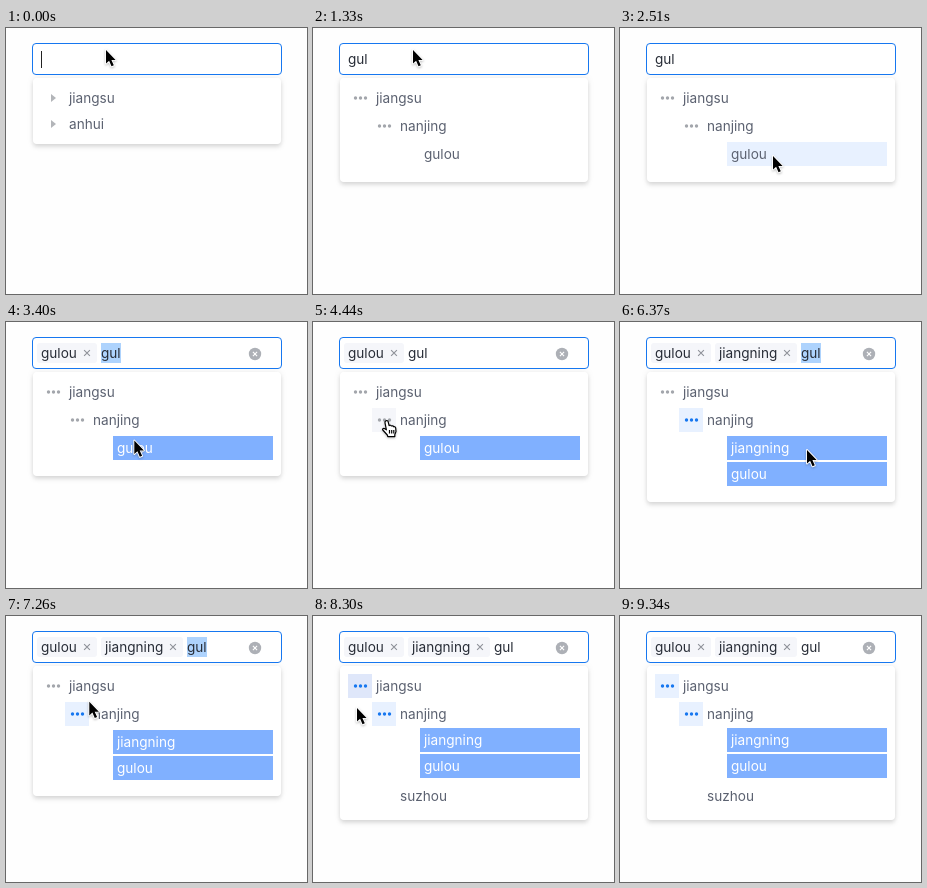
These frames come from a looping animation (301x266 px, 9940 ms). An HTML page:

```html
<!DOCTYPE html>
<html lang="en">
<head>
<meta charset="utf-8">
<title>Tree select search</title>
<style>
  html, body { margin: 0; width: 100%; height: 100%; overflow: hidden; background: #fefefe; }
  svg { display: block; font: 13.6px Inter, "Liberation Sans", sans-serif; }
  .menu { fill: #fff; filter: drop-shadow(0 0 3px rgba(0,0,0,.07)) drop-shadow(0 3px 2px rgba(0,0,0,.12)); }
</style>
</head>
<body>
<svg id="stage" width="301" height="266" viewBox="0 0 301 266"></svg>
<script>
const LOOP = 9940, TICK = 148;
const INK = '#272c36', GRAY = '#5b6170', BLUE = '#1677f0', PALE = '#e8f1ff';

// pointer stops: tick, x, y
const path = [
  [0, 100, 22], [12, 100, 22], [17, 153, 128], [20, 153, 128], [28, 75, 98], [33, 75, 98],
  [37, 167, 131], [40, 167, 131], [41, 187, 128], [45, 187, 128], [51, 47, 71],
  [55, 47, 71], [56, 44, 92], [63, 200, 272], [70, 200, 272]
];

function pointer(k) {
  const i = path.findIndex(p => p[0] > k);
  const [k0, x0, y0] = path[i - 1], [k1, x1, y1] = path[i];
  const u = (k - k0) / (k1 - k0), e = u * u * (3 - 2 * u);
  return { x: x0 + (x1 - x0) * e, y: y0 + (y1 - y0) * e };
}

const inside = (p, x, y, w, h) => p.x >= x && p.x < x + w && p.y >= y && p.y < y + h;
const rect = (x, y, w, h, fill, r = 0) =>
  `<rect x="${x}" y="${y}" width="${w}" height="${h}" rx="${r}" fill="${fill}"/>`;
const text = (s, x, mid, fill = GRAY) => `<text x="${x}" y="${mid + 5}" fill="${fill}">${s}</text>`;
const cross = (x, y, r, color) =>
  `<path d="M${x - r} ${y - r}l${2 * r} ${2 * r}m0 ${-2 * r}l${-2 * r} ${2 * r}" stroke="${color}" stroke-width="1.1"/>`;
const tag = (s, x, w) => rect(x, 21, w, 20, '#f5f6fa', 3) + text(s, x + 4, 31, INK) + cross(x + w - 10, 31, 2.9, '#8e9199');
const arrow = (x, y) => `<path d="M${x} ${y - 4}v8l5-4z" fill="#b3b5b9"/>`;

function branch(s, x, y, open, hover) {
  const bg = open ? (hover ? '#dfe7fa' : PALE) : '#f5f6fa';
  let out = open || hover ? rect(x, y - 12, 24, 24, bg) : '';
  for (const d of [7.5, 12.5, 17.5])
    out += `<circle cx="${x + d}" cy="${y}" r="1.7" fill="${open ? BLUE : '#a3a6ac'}"/>`;
  return out + text(s, x + 28, y);
}

function leaf(s, y, picked, p) {
  const box = [107, y - 12, 160, 24];
  const fill = picked ? '#80b0ff' : inside(p, ...box) ? PALE : '';
  return (fill ? rect(...box, fill) : '') + text(s, 111, y, picked ? '#fff' : GRAY);
}

function cursor(p, hand) {
  const shape = hand
    ? `<path transform="translate(${p.x - 6} ${p.y})" fill="#fff" stroke="#000" stroke-width="1.2" stroke-linejoin="round"
        d="M4 .8c1-.5 2 0 2.2 1l.9 3.8c.8-.7 2-.4 2.3.4c.9-.5 2-.1 2.3.8c1-.4 2 .2 2 1.3l.3 3.5l-1.2 3v2h-7l-.5-1.6l-4.5-5c-.6-1 .5-2.1 1.6-1.5l2 1.3l-1.4-7c-.1-.9.3-1.7 1-2zM7.5 10v3.5M9.7 10v3.5M11.8 10v3.5"/>`
    : `<path transform="translate(${p.x} ${p.y})" stroke="#fff" stroke-width="1.8" paint-order="stroke" stroke-linejoin="round"
        d="M0 0v13.6l3.1-2.9l2.4 5.6l2.3-1l-2.4-5.4h4.2z"/>`;
  return `<g style="filter:drop-shadow(0 1px 1px rgba(0,0,0,.25))">${shape}</g>`;
}

function input(k) {
  const tags = (k >= 19) + (k >= 43), x = [35, 95, 181][tags];
  const typed = 'gul'.slice(0, Math.max(0, k - 3));
  const marked = (k >= 19 && k < 30) || (k >= 43 && k < 52);
  const caret = k < 1 || (k >= 4 && k < 9) || (k >= 12 && k < 15);
  let out = `<rect x="26.5" y="15.5" width="249" height="31" rx="3.5" fill="#fff" stroke="${BLUE}"/>`;
  if (tags) {
    out += tag('gulou', 31, 60) + `<circle cx="249" cy="32" r="6.2" fill="#adb0b6"/>` + cross(249, 32, 2.1, '#fff');
  }
  if (tags > 1) out += tag('jiangning', 95, 82);
  if (marked) out += rect(x, 21, 20, 20, '#aed3fd');
  if (caret) out += rect(x + [0, 8, 16, 19][typed.length], 23, 1, 17, '#222');
  return out + text(typed, x, 31, INK);
}

function menu(k, p) {
  const found = k >= 8, openCity = k >= 31, openTop = k >= 53;
  const bottom = openTop ? 204 : openCity ? 180 : found ? 154 : 116;
  const out = `<rect class="menu" x="27" y="50" width="248" height="${bottom - 50}" rx="4"/>`;
  if (!found) return out + arrow(45, 70) + text('jiangsu', 63, 70) + arrow(45, 96) + text('anhui', 63, 96);
  // the toggle background fades one tick late
  const hover = (x, y) => inside(p, x, y, 24, 24) || inside(pointer(Math.max(0, k - 1)), x, y, 24, 24);
  const first = openTop ? 124 : 126;
  return out
    + branch('jiangsu', 35, 70, openTop, hover(35, 58))
    + branch('nanjing', 59, 98, openCity, hover(59, 86))
    + (openCity ? leaf('jiangning', first, k >= 43, p) : '')
    + leaf('gulou', openCity ? first + 26 : first, k >= 19, p)
    + (openTop ? text('suzhou', 87, 180) : '');
}

const stage = document.getElementById('stage');
let shown = -1;

function frame(now) {
  const k = Math.floor((now % LOOP) / TICK + .06);
  if (k !== shown) {
    shown = k;
    const p = pointer(k);
    const hand = k > 20 && (inside(p, 59, 86, 24, 24) || inside(p, 35, 58, 24, 24));
    stage.innerHTML = menu(k, p) + input(k) + cursor(p, hand);
  }
  requestAnimationFrame(frame);
}
frame(0);
</script>
</body>
</html>
```
